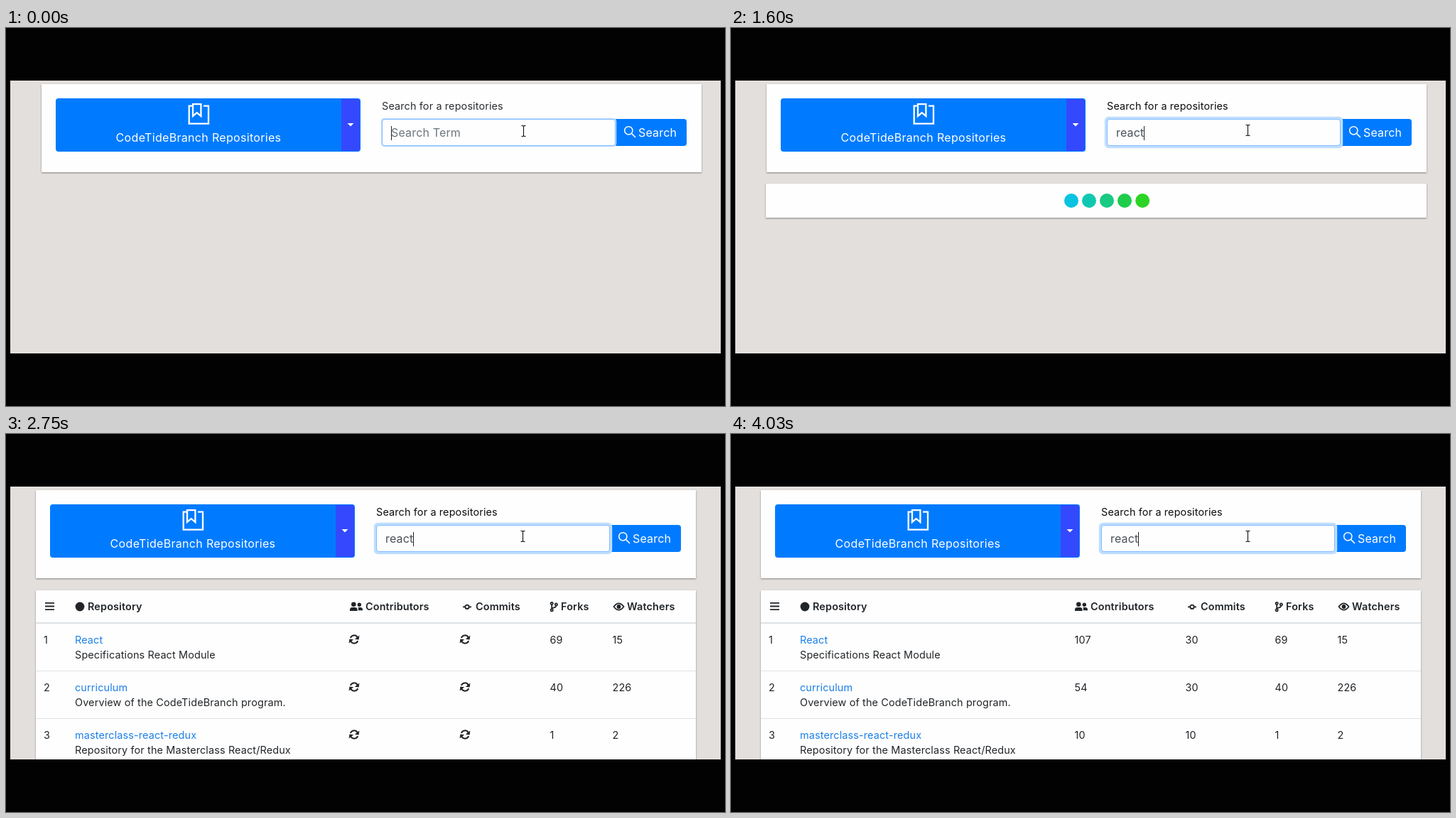
Write an HTML page that moves like this. It is 1012 by 532 pixels and loops after 4170 ms.

```html
<!DOCTYPE html>
<html lang="en">
<head>
<meta charset="utf-8">
<title>Repository search</title>
<style>
  html, body { margin: 0; width: 100%; height: 100%; overflow: hidden; background: #020203; }
  svg { display: block; width: 1012px; height: 532px; }
  text { font: 14.4px Inter, "Open Sans", sans-serif; letter-spacing: .01em; fill: #212529; white-space: pre; }
  .big { font-size: 16px; }
  .white { fill: #fff; }
  .head { font-weight: 600; }
  .link { fill: #1a7fe8; }
  .list text { font: 11.4px "Open Sans", "Noto Sans", sans-serif; letter-spacing: 0; fill: #000; }
  .card { fill: #fefefe; filter: drop-shadow(0 1px 1.2px rgba(0, 0, 0, .42)); }
  .line { fill: none; stroke: #212529; }
</style>
</head>
<body>
<svg viewBox="0 0 1012 532">
  <defs>
    <clipPath id="view"><rect x="6" y="74" width="1000" height="384"/></clipPath>
    <g id="sync">
      <g id="half">
        <path d="M-1.5 5.4A5.4 5.4 0 0 1-3.4-4.2" fill="none" stroke="#212529" stroke-width="2"/>
        <path d="M-6.4-6.6H-.4V-.8Z" fill="#212529"/>
      </g>
      <use href="#half" transform="rotate(180)"/>
    </g>
  </defs>
  <rect width="1012" height="532" fill="#020203"/>
  <g clip-path="url(#view)">
    <rect x="6" y="74" width="1000" height="384" fill="#e2dfdd"/>
    <g id="page">
      <rect class="card" x="50" y="79" width="929" height="124"/>

      <rect x="70" y="99" width="429" height="75" rx="4" fill="#007bff"/>
      <path d="M472 100H495a3 3 0 0 1 3 3V170a3 3 0 0 1-3 3H472Z" fill="#3449fd"/>
      <path d="M480.6 134H489.4L485 138.4Z" fill="#fff"/>
      <path d="M263 109.7H257.7V134.7H285V109.7H278M263 107.2H274.4V124L268.7 119.2L263 124Z"
            fill="none" stroke="#fff" stroke-width="2.3"/>
      <text class="big white" x="271" y="159.5" text-anchor="middle" style="letter-spacing:.02em">CodeTideBranch Repositories</text>

      <text id="label" x="529" y="115">Search for a repositories</text>
      <path d="M858 128H954a4 4 0 0 1 4 4V162a4 4 0 0 1-4 4H858Z" fill="#007bff"/>
      <g fill="none" stroke="#fff" stroke-width="1.5">
        <circle cx="876.3" cy="144.3" r="5.6"/>
        <path d="M880.4 148.4L886 154"/>
      </g>
      <text class="big white" x="890" y="152.5">Search</text>

      <rect id="glow" fill="#bfdeff"/>
      <rect x="529.5" y="128.5" width="328" height="37" rx="3.5" fill="#fefefe" stroke="#80bdff"/>
      <text id="field" class="big" x="542" y="152.5"></text>
      <rect id="caret" y="138" width="1" height="20" fill="#222"/>

      <g id="loader">
        <rect class="card" x="49" y="219" width="930" height="48"/>
        <g id="dots"></g>
      </g>

      <g id="table">
        <rect id="sheet" class="card" x="50" y="220" width="929"/>
        <path class="line" stroke-width="1.8" d="M63 237.8H76M63 242.5H76M63 247.2H76"/>
        <circle cx="112" cy="243" r="6.4" fill="#212529"/>
        <g fill="#212529">
          <circle cx="497.3" cy="239.8" r="3.3"/>
          <path d="M492 249V247.2a3.4 3.4 0 0 1 3.4-3.2H499.2a3.4 3.4 0 0 1 3.4 3.2V249Z"/>
          <circle cx="505.3" cy="240.3" r="2.7"/>
          <path d="M503.8 248.2H510V246.6a2.8 2.8 0 0 0-2.8-2.5H503.4q1 1.6.4 4.1Z"/>
        </g>
        <g class="line" stroke-width="1.8">
          <circle cx="657" cy="243.3" r="2.7"/>
          <path d="M651 243.3H654.3M659.7 243.3H663"/>
          <circle cx="776.2" cy="238.5" r="1.6"/>
          <circle cx="776.2" cy="248" r="1.6"/>
          <circle cx="782.4" cy="240" r="1.6"/>
          <path d="M776.2 240V246.5M782.4 241.6Q782.4 244.4 776.4 245"/>
          <path d="M863.5 243Q870.5 233.6 877.5 243Q870.5 252.4 863.5 243Z"/>
        </g>
        <circle cx="870.5" cy="243" r="2.9" fill="#212529"/>
        <g id="heads"></g>
        <g id="rows"><path d="M50 266H979" stroke="#dee2e6" stroke-width="2"/></g>
      </g>

      <g id="list" class="list">
        <path d="M536 289H859V172H861V291H536Z" fill="#777" opacity=".75"/>
        <rect x="529.5" y="166.5" width="328" height="121" fill="#fefefe" stroke="#a0a0a0"/>
      </g>
    </g>
    <path id="mouse" d="M-3-7.5H-1L0-6.5L1-7.5H3M0-6.5V6.5M-3 7.5H-1L0 6.5L1 7.5H3"
          fill="none" stroke="#111" stroke-width="1.1"/>
  </g>
</svg>
<script>
const LOOP = 4170;
const $ = id => document.getElementById(id);

function add(parent, tag, attrs, content = "") {
  const node = document.createElementNS("http://www.w3.org/2000/svg", tag);
  for (const key in attrs) node.setAttribute(key, attrs[key]);
  node.textContent = content;
  return parent.appendChild(node);
}
const write = (parent, x, y, content, cls = "") => add(parent, "text", { x, y, class: cls }, content);
const show = (node, on) => node.style.display = on ? "" : "none";

["reactfsdfsd", "reactgfdg", "react656", "reactgdfg", "reactgfdgd", "reactgfdgdtr"]
  .forEach((word, i) => write($("list"), 535, 182 + 20 * i, word));

[[123, "Repository"], [514, "Contributors"], [669, "Commits"], [789, "Forks"], [882, "Watchers"]]
  .forEach(([x, name]) => write($("heads"), x, 248, name, "head"));

const repos = [
  { name: "React", about: "Specifications React Module", counts: [107, 30], forks: 69, watchers: 15, ready: 4030 },
  { name: "curriculum", about: "Overview of the CodeTideBranch program.", counts: [54, 30], forks: 40, watchers: 226, ready: 3970 },
  { name: "masterclass-react-redux", about: "Repository for the Masterclass React/Redux", counts: [10, 10], forks: 1, watchers: 2, ready: 3910 }
];
const cells = [];
repos.forEach((repo, i) => {
  const y = 295 + 67 * i, rows = $("rows");
  write(rows, 61, y, i + 1);
  write(rows, 105, y, repo.name, "link");
  write(rows, 105, y + 21, repo.about);
  write(rows, 773.5, y, repo.forks);
  write(rows, 861.5, y, repo.watchers);
  if (i) add(rows, "path", { d: `M50 ${266.5 + 67 * i}H979`, stroke: "#dee2e6" });
  repo.counts.forEach((count, k) => cells.push({
    x: 498 + 156 * k, y: y - 6, ready: repo.ready,
    icon: add(rows, "use", { href: "#sync" }),
    count: write(rows, 491.5 + 156 * k, y, count)
  }));
});

const dots = ["#08c4e0", "#10c8b0", "#18ca82", "#20cc4c", "#22d21c"]
  .map(fill => add($("dots"), "circle", { cy: 243, r: 10, fill }));

const typed = [[920, "react"], [640, "reac"], [520, "rea"], [400, "re"], [280, "r"]];
// Caret toggles; it starts visible.
const blinks = [1030, 1530, 2030, 2600, 3100, 3640];

function draw(t) {
  const spread = t < 30 ? 1.2 : t < 70 ? 2.2 : 3.2;
  const glow = { x: 529 - spread, y: 128 - spread, width: 329 + 2 * spread, height: 38 + 2 * spread, rx: 4 + spread / 2 };
  for (const key in glow) $("glow").setAttribute(key, glow[key]);

  const entry = typed.find(([from]) => t >= from);
  const field = $("field");
  field.textContent = entry ? entry[1] : "Search Term";
  field.style.fill = entry ? "#495057" : "#6c757d";
  $("caret").setAttribute("x", entry ? Math.round(542 + field.getComputedTextLength()) : 542);
  show($("caret"), blinks.filter(b => t >= b).length % 2 === 0);

  $("label").style.fill = t < 1570 ? "#2b2e32" : "#0c0d0e";
  show($("list"), t >= 320 && t < 1570);
  show($("loader"), t >= 1570 && t < 2070);
  show($("table"), t >= 2070);

  dots.forEach((dot, i) => {
    const p = Math.max(0, (t - 1570) / 320 - (4 - i));
    dot.setAttribute("cx", 479 + 25 * i + 20 * p * p);
    dot.setAttribute("opacity", Math.max(0, 1 - .43 * p));
  });

  const loaded = t >= 2710;
  $("page").setAttribute("transform", `translate(${loaded ? -8 : 0})`);
  $("sheet").setAttribute("height", loaded ? 260 : 47);
  show($("rows"), loaded);
  const angle = (t - 3210) * 360 / 2000;
  for (const cell of cells) {
    show(cell.icon, t < cell.ready);
    show(cell.count, t >= cell.ready);
    cell.icon.setAttribute("transform", `translate(${cell.x} ${cell.y}) rotate(${angle})`);
  }

  $("mouse").setAttribute("transform", t < 70 ? "translate(728.5 145)" : "translate(727.5 144)");
}

const start = performance.now();
function tick() {
  draw((performance.now() - start) % LOOP);
  requestAnimationFrame(tick);
}
tick();
</script>
</body>
</html>
```
